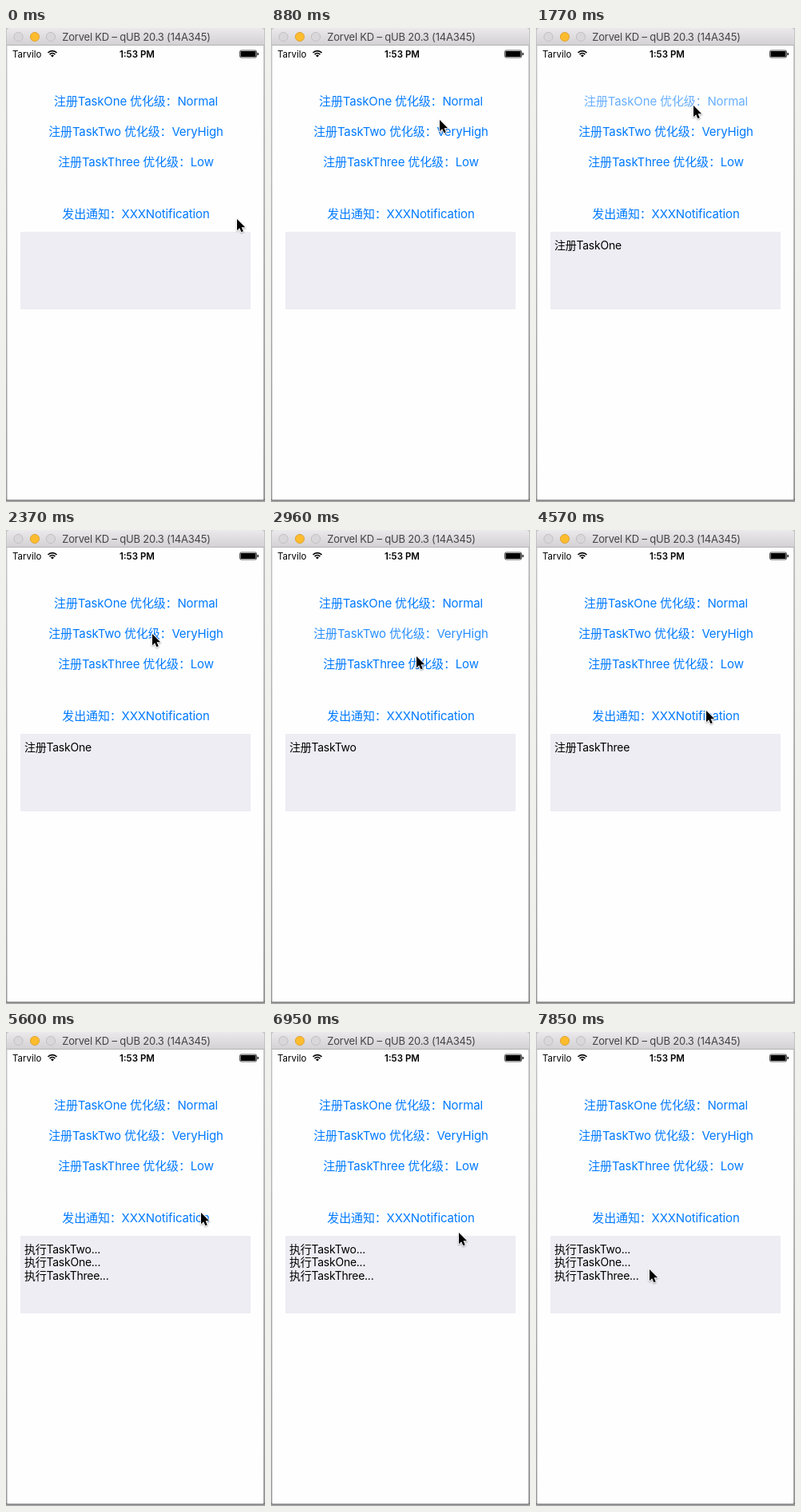
These frames come from a looping animation (324 px wide and 593 px high, 8 s). An HTML page with a canvas:

```html
<!DOCTYPE html>
<html lang="zh-CN">
<head>
<meta charset="utf-8">
<title>Task notification demo</title>
<style>
  html, body { margin: 0; width: 100%; height: 100%; overflow: hidden; background: #fff; }
  canvas { display: block; width: 324px; height: 593px; }
</style>
</head>
<body>
<canvas id="stage"></canvas>
<script>
const W = 324, H = 593, LOOP = 8000;
const FONT = 'Inter, "Noto Sans CJK SC", "Noto Sans CJK", sans-serif';
const canvas = document.getElementById('stage');
const ctx = canvas.getContext('2d');
const ratio = window.devicePixelRatio || 1;
canvas.width = W * ratio;
canvas.height = H * ratio;

// Pressed buttons dim, then fade back; one alpha per tick.
const TAP = [0.2, 0.6, 0.84, 0.95];
const buttons = [
  { text: '注册TaskOne 优化级：Normal', y: 97, press: 11, fade: TAP },
  { text: '注册TaskTwo 优化级：VeryHigh', y: 135, press: 18, fade: TAP },
  { text: '注册TaskThree 优化级：Low', y: 173, press: 24, fade: [0.6, 0.25, 0.35, 0.6, 0.84, 0.95] },
  { text: '发出通知：XXXNotification', y: 238, press: 32, fade: TAP }
];

// Output from each tick onward.
const logs = [
  [0, []],
  [12, ['注册TaskOne']],
  [19, ['注册TaskTwo']],
  [26, ['注册TaskThree']],
  [33, ['执行TaskTwo...', '执行TaskOne...', '执行TaskThree...']]
];

// Pointer waypoints: tick, x, y.
const path = [
  [0, 289, 239], [2, 279, 220], [5, 221, 130], [7, 200, 100], [8, 197, 96],
  [13, 197, 97], [15, 186, 124], [16, 183, 130], [19, 183, 132],
  [20, 182, 158], [22, 182, 171], [27, 182, 171], [29, 193, 197],
  [31, 213, 226], [35, 213, 226], [38, 244, 226], [39, 254, 220],
  [40, 255, 220], [42, 255, 220], [43, 255, 219], [46, 255, 219],
  [48, 214, 282], [50, 140, 327], [51, 137, 315], [53, 142, 297]
];

// The picture steps about seven times a second.
const tickAt = t => t < 5600
  ? Math.floor((t + 10) / 147.5)
  : Math.min(53, 38 + Math.floor((t - 5600) / 150));

function pointerAt(tick) {
  const i = path.findIndex(p => p[0] >= tick);
  if (i < 1) return path[0].slice(1);
  const [t0, x0, y0] = path[i - 1], [t1, x1, y1] = path[i];
  const k = (tick - t0) / (t1 - t0);
  return [Math.round(x0 + (x1 - x0) * k), Math.round(y0 + (y1 - y0) * k)];
}

function rect(x, y, w, h, color) {
  ctx.fillStyle = color;
  ctx.fillRect(x, y, w, h);
}

function label(text, x, y, size, color, { align = 'left', weight = 400, spacing = 0 } = {}) {
  ctx.font = `${weight} ${size}px ${FONT}`;
  ctx.letterSpacing = spacing + 'px';
  ctx.textAlign = align;
  ctx.fillStyle = color;
  ctx.fillText(text, x, y);
}

function gradient(y0, y1, from, to) {
  const g = ctx.createLinearGradient(0, y0, 0, y1);
  g.addColorStop(0, from);
  g.addColorStop(1, to);
  return g;
}

function light(x, fill, edge) {
  ctx.beginPath();
  ctx.arc(x, 11, 5.6, 0, Math.PI * 2);
  ctx.fillStyle = fill;
  ctx.fill();
  ctx.lineWidth = 0.9;
  ctx.strokeStyle = edge;
  ctx.stroke();
}

function drawWindow() {
  rect(0, 0, W, H, gradient(0, H, '#c4c4c4', '#999'));
  rect(0, 589, W, 4, gradient(589, 593, '#777', '#aaa'));
  rect(1.5, 21, 320.5, 569, '#fefefe');
  ctx.beginPath();
  ctx.roundRect(1, 0, 322, 22, [4, 4, 0, 0]);
  ctx.fillStyle = gradient(0, 22, '#ebe9eb', '#d2d0d2');
  ctx.fill();
  rect(1, 21, 322, 1, '#b5b3b5');
  light(15.5, '#d9d7d9', '#bfbdbf');
  light(36, '#fdbc2e', '#dca033');
  light(56, '#d9d7d9', '#bfbdbf');
  label('Zorvel KD – qUB 20.3 (14A345)', 163, 16, 13, '#454345', { align: 'center', spacing: -0.2 });
}

function drawWifi(x, y) {
  const a = Math.PI * 0.25;
  ctx.strokeStyle = ctx.fillStyle = '#000';
  ctx.lineWidth = 1.7;
  for (const r of [4.8, 7.8]) {
    ctx.beginPath();
    ctx.arc(x, y, r, -Math.PI + a, -a);
    ctx.stroke();
  }
  ctx.beginPath();
  ctx.moveTo(x, y);
  ctx.arc(x, y, 2.8, -Math.PI + a, -a);
  ctx.fill();
}

function drawStatus() {
  label('Tarvilo', 8, 36.5, 11.5, '#000');
  drawWifi(58, 36.5);
  label('1:53 PM', 164, 36.5, 11.5, '#000', { align: 'center', weight: 600 });
  ctx.beginPath();
  ctx.roundRect(292.5, 28, 21, 9, 1.8);
  ctx.lineWidth = 0.7;
  ctx.strokeStyle = '#000';
  ctx.stroke();
  rect(293.5, 29, 19, 7, '#000');
  rect(314.5, 31, 1.3, 3, '#000');
}

function drawButtons(tick) {
  for (const b of buttons) {
    ctx.globalAlpha = b.fade[tick - b.press] ?? 1;
    label(b.text, 162.5, b.y, 15, '#007aff', { align: 'center', spacing: -0.15 });
  }
  ctx.globalAlpha = 1;
}

function drawLog(tick) {
  rect(18, 255, 288, 97, '#eeedf3');
  const lines = logs.filter(l => l[0] <= tick).pop()[1];
  lines.forEach((s, i) => label(s, 23, 276.5 + i * 16.7, 14, '#000', { spacing: -0.25 }));
}

function drawPointer(x, y) {
  const shape = new Path2D('M0 0V14.2L3.2 11.2L5.4 16.2L7.8 15.2L5.6 10.3H10.2Z');
  ctx.save();
  ctx.translate(x, y);
  ctx.lineJoin = 'round';
  ctx.shadowColor = 'rgba(0,0,0,.35)';
  ctx.shadowBlur = 2 * ratio;
  ctx.shadowOffsetY = ratio;
  ctx.lineWidth = 1.8;
  ctx.strokeStyle = '#fff';
  ctx.stroke(shape);
  ctx.shadowColor = 'transparent';
  ctx.fillStyle = '#000';
  ctx.fill(shape);
  ctx.restore();
}

function draw(now) {
  const tick = tickAt(now % LOOP);
  ctx.setTransform(ratio, 0, 0, ratio, 0, 0);
  drawWindow();
  drawStatus();
  drawButtons(tick);
  drawLog(tick);
  drawPointer(...pointerAt(tick));
  requestAnimationFrame(draw);
}
requestAnimationFrame(draw);
</script>
</body>
</html>
```
